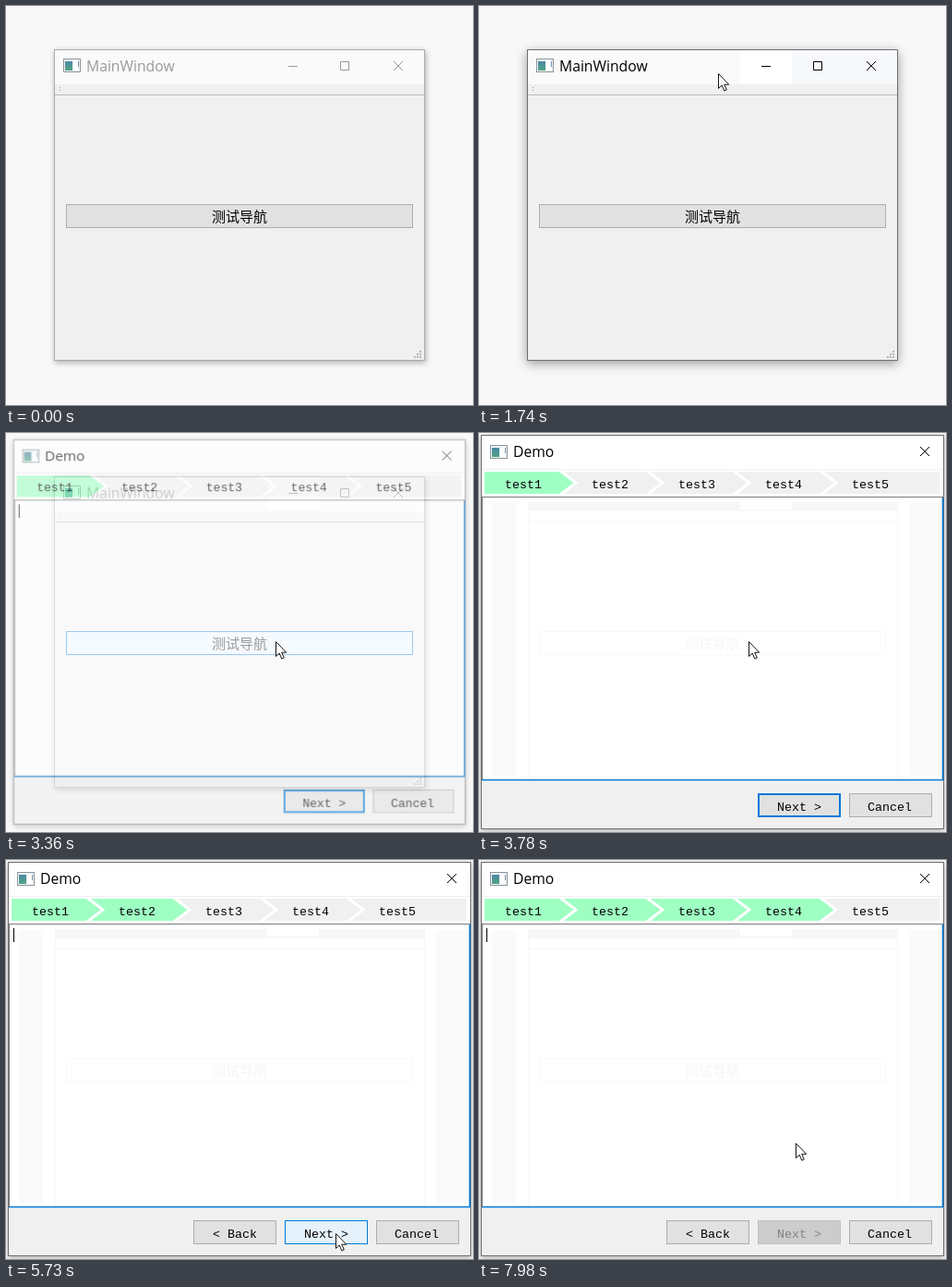
An HTML page that plays this animation: 506 px wide and 433 px high, repeating every 8000 ms.

```html
<!DOCTYPE html>
<html lang="zh">
<head>
<meta charset="utf-8">
<title>Wizard demo</title>
<style>
html, body { margin: 0; width: 506px; height: 433px; overflow: hidden; background: #f8f8f8; }
svg { display: block; }
text { white-space: pre; }
.title { font: 15.7px "Open Sans", "Noto Sans", sans-serif; }
.han { font: 15px "Noto Sans CJK SC", "Noto Sans CJK", sans-serif; text-anchor: middle; }
.mono { font: 13.33px "Liberation Mono", monospace; text-anchor: middle; }
.line { fill: none; stroke: #000; }
.button { fill: #e1e1e1; stroke: #adadad; }
#dialog { transform-origin: 253px 216px; }
#dialogFrame { filter: drop-shadow(0 2px 3px rgba(0, 0, 0, .3)); }
</style>
</head>
<body>
<svg width="506" height="433" viewBox="0 0 506 433">
  <defs>
    <linearGradient id="teal" x2="0" y2="1">
      <stop stop-color="#4d86a6"/><stop offset="1" stop-color="#4fa583"/>
    </linearGradient>
    <g id="icon">
      <rect x=".5" y=".5" width="18" height="14" fill="#f2f4f6" stroke="#8b959d"/>
      <rect x="2" y="3" width="8" height="10" fill="url(#teal)"/>
      <path d="M11 3h5v10h-5z" fill="#fff"/>
      <path d="M16.5 3v6" stroke="#6f8fa8"/>
    </g>
  </defs>

  <g id="main">
    <rect id="mainFrame" x="52.5" y="47.5" width="401" height="337" fill="#f0f0f0" stroke="#aaa"/>
    <path d="M53 48h400v37H53z" fill="#fafafa"/>
    <path id="controls" d="M339 48h114v36H339z" fill="#f6f8fb"/>
    <path id="minHover" d="M283 48h56v36h-56z" fill="#fff"/>
    <use href="#icon" x="62" y="57"/>
    <text id="mainTitle" class="title" x="87" y="71">MainWindow</text>
    <path id="glyphs" class="line" d="M306 65.5h10M362.5 60.5h9v9h-9zM420 60l10 10m0-10l-10 10"/>
    <path d="M53 96.5h400" stroke="#b9b9b9"/>
    <path d="M58.5 88v6" stroke="#999" stroke-dasharray="1 2"/>
    <rect id="start" class="button" x="65.5" y="215.5" width="375" height="25"/>
    <text class="han" x="253" y="234">测试导航</text>
    <path d="M448 375h2M445 378h5M442 381h8" stroke="#b4b4b4" stroke-width="2" stroke-dasharray="2 1"/>
  </g>

  <g id="dialog">
    <rect id="dialogFrame" x="2.5" y="2.5" width="501" height="427" fill="#f0f0f0" stroke="#707070"/>
    <path d="M3 3h500v66H3z" fill="#fff"/>
    <path d="M3 39.5h500" stroke="#f0f0f0"/>
    <use href="#icon" x="12" y="13"/>
    <text class="title" x="37" y="26">Demo</text>
    <path class="line" d="M478 15l10 10m0-10l-10 10"/>
    <g id="tabs"></g>
    <rect x="3.5" y="69.5" width="499" height="307" fill="#fff" stroke="#7a7a7a"/>
    <g id="ghost">
      <path d="M14 76h26v296H14zM466 76h36v296h-36z" fill="#fafafa"/>
      <path d="M53 75h401v10H53z" fill="#f7f7f7"/>
      <path d="M283 75h56v8h-56z" fill="#fff"/>
      <path d="M53.5 85v290M453.5 85v290M53 96.5h400M65.5 215.5h375v25h-375z" fill="none" stroke="#f8f8f8"/>
      <text class="han" x="253" y="234" fill="#f5f5f5">测试导航</text>
    </g>
    <path id="focus" d="M502.5 70v306.5H3" fill="none" stroke="#0078d7" stroke-width="1.6"/>
    <path id="caret" d="M8.5 74v15" stroke="#000"/>
    <g id="back">
      <rect class="button" x="203.5" y="391.5" width="89" height="25"/>
      <text class="mono" x="248" y="410">&lt; Back</text>
    </g>
    <rect id="next" x="302.5" y="391.5" width="89" height="25"/>
    <rect id="ring" x="303" y="392" width="88" height="24" fill="none" stroke="#0078d7" stroke-width="2"/>
    <text id="nextText" class="mono" x="347" y="410">Next &gt;</text>
    <rect class="button" x="401.5" y="391.5" width="89" height="25"/>
    <text class="mono" x="445" y="410">Cancel</text>
  </g>

  <path id="cursor" d="M.5 .5v16l3.7-3.5 2.6 6 2.5-1.1-2.6-5.7h5z" fill="#fff" stroke="#111"/>
</svg>
<script>
const LOOP = 8000;
const HOLD = 'steps(1)';

// rows: [ms, style, easing to the next row]; values hold unless an easing is given
function track(id, rows) {
  const steps = rows.map(([ms, style, easing = HOLD]) => ({ ...style, easing, offset: ms / LOOP }));
  steps.push({ ...rows[rows.length - 1][1], offset: 1 });
  document.getElementById(id).animate(steps, { duration: LOOP, iterations: Infinity });
}

// Alternates hidden and shown at the given times, hidden first
function blink(id, times, first = 0) {
  track(id, [0, ...times].map((ms, i) => [ms, { opacity: (i + first) % 2 }]));
}

const paint = (fill, stroke) => ({ fill, stroke });
const at = (x, y) => ({ transform: `translate(${x}px, ${y}px)` });

// Arrow tabs, drawn right to left so each tip overlaps its neighbour
const TAB = 94;
let tabs = '';
for (let i = 4; i >= 0; i--) {
  const left = i ? TAB * i - 6 : 6;
  const right = TAB * i + 88;
  const shape = i < 4
    ? `M${left} 42H${right}l17 12-17 12H${left}z`
    : `M${left} 42H499V66H${left}z`;
  const edge = i < 4 ? `<path d="M${right} 41l17 13-17 13" fill="none" stroke="#fff" stroke-width="3"/>` : '';
  tabs += `<path id="tab${i}" d="${shape}" fill="${i ? '#f0f0f0' : '#9fffc3'}"/>${edge}`;
}
for (let i = 0; i < 5; i++) {
  tabs += `<text class="mono" x="${48 + TAB * i}" y="60">test${i + 1}</text>`;
}
document.getElementById('tabs').innerHTML = tabs;

// Main window focus
const ACTIVE = 1740, OPEN = 3270;
const idleFrame = { stroke: '#aaa', filter: 'drop-shadow(1px 2px 3px rgba(0,0,0,.3))' };
track('mainFrame', [
  [0, idleFrame],
  [ACTIVE, { stroke: '#707070', filter: 'drop-shadow(0 3px 6px rgba(0,0,0,.38))' }],
  [OPEN, idleFrame]
]);
track('mainTitle', [[0, { fill: '#999' }], [ACTIVE, { fill: '#000' }], [OPEN, { fill: '#999' }]]);
track('glyphs', [[0, { stroke: '#999' }], [ACTIVE, { stroke: '#000' }], [OPEN, { stroke: '#777' }]]);
blink('controls', [ACTIVE, OPEN]);
track('minHover', [[0, { opacity: 0 }], [450, { opacity: 0 }, 'linear'], [600, { opacity: 1 }]]);

const normal = paint('#e1e1e1', '#adadad');
const hover = paint('#e5f1fb', '#0078d7');
const pressed = paint('#cce4f7', '#005499');
track('start', [[0, normal], [3150, pressed], [OPEN, hover]]);

// Dialog opening
track('dialog', [
  [0, { transform: 'scale(.9)' }],
  [OPEN, { transform: 'scale(.9)' }, 'cubic-bezier(.165,.84,.44,1)'],
  [3570, { transform: 'scale(1)' }]
]);
track('dialog', [[0, { opacity: 0 }], [OPEN, { opacity: 0 }, 'linear'], [3420, { opacity: 1 }]]);
blink('ghost', [3570]);

// Next is pressed three times; each release turns a page
const clicks = [[5190, 5280], [6090, 6180], [6420, 6510]];
clicks.forEach(([, up], i) => track('tab' + (i + 1), [[0, { fill: '#f0f0f0' }], [up, { fill: '#9fffc3' }]]));
blink('back', [5280]);
blink('focus', clicks.flat(), 1);
blink('caret', [OPEN, 3780, 4290, 4800, 5280, 5790, 6180, 6420, 6510, 7020, 7530]);
track('next', [
  [0, normal], [4890, normal, 'linear'], [5070, hover],
  [5190, pressed], [5280, hover],
  [6090, pressed], [6180, hover],
  [6420, pressed], [6510, hover, 'linear'],
  [6750, paint('#cccccc', '#bfbfbf')]
]);
track('ring', [[0, { opacity: 1 }], [4890, { opacity: 1 }, 'linear'], [5070, { opacity: 0 }]]);
track('nextText', [[0, { fill: '#000' }], [6510, { fill: '#000' }, 'linear'], [6750, { fill: '#838383' }]]);

track('cursor', [
  [0, at(520, 22)],
  [180, at(500, 22), 'linear'],
  [330, at(420, 40), 'linear'],
  [480, at(335, 66), 'linear'],
  [660, at(285, 79), 'ease-out'],
  [930, at(259, 73)],
  [1950, at(259, 73), 'ease-in-out'],
  [2580, at(292, 226)],
  [4050, at(292, 226), 'ease-in'],
  [4440, at(325, 295), 'linear'],
  [4770, at(355, 383), 'linear'],
  [4860, at(355, 390), 'linear'],
  [5070, at(356, 405)],
  [5730, at(357, 405)],
  [7770, at(357, 405), 'linear'],
  [7980, at(343, 307)]
]);
</script>
</body>
</html>
```
